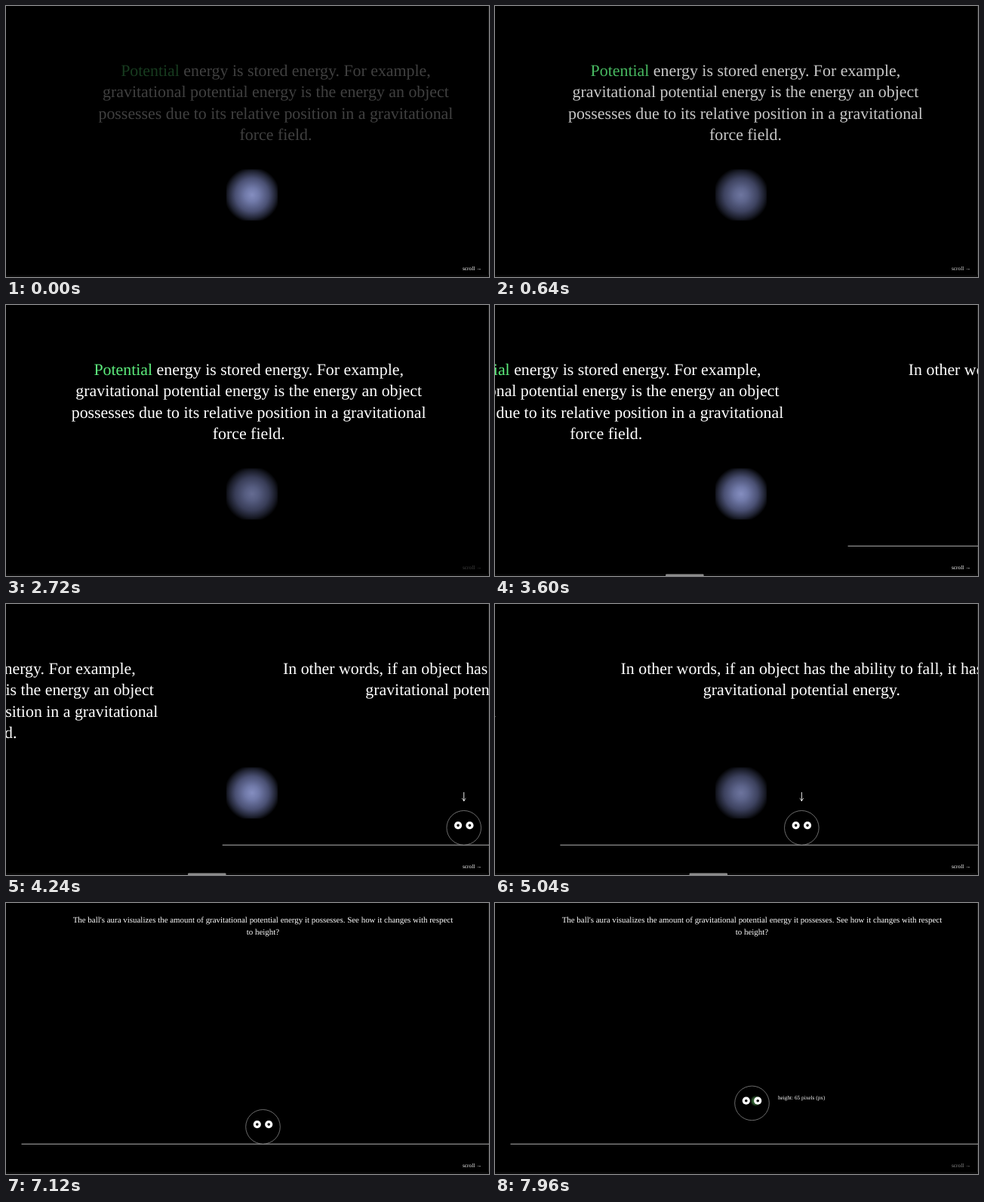
An HTML page for the animation above (8 s loop, 640 px wide and 360 px high).

```html
<!DOCTYPE html>
<html lang="en">
<head>
<meta charset="utf-8">
<title>Potential energy</title>
<style>
  html, body { margin: 0; width: 100%; height: 100%; overflow: hidden; background: #000; }
  svg { display: block; width: 640px; height: 360px; }
  text { font-family: "Liberation Serif", "Times New Roman", serif; fill: #fff; text-rendering: geometricPrecision; }
  .big { font-size: 21.87px; text-anchor: middle; }
  .mid { font-size: 10.94px; text-anchor: middle; }
  .small { font-size: 7.29px; }
  .key { fill: #5cec7c; }
</style>
</head>
<body>
<svg viewBox="0 0 640 360">
  <defs>
    <radialGradient id="blue" gradientUnits="userSpaceOnUse" cx="326" cy="251" r="37">
      <stop offset="0" stop-color="#858ec0"/>
      <stop offset=".25" stop-color="#717aa9"/>
      <stop offset=".6" stop-color="#4a5073"/>
      <stop offset=".85" stop-color="#1f2231"/>
      <stop offset="1" stop-color="#000"/>
    </radialGradient>
    <radialGradient id="green">
      <stop offset="0" stop-color="#3f7a3f"/>
      <stop offset=".6" stop-color="#2c552c"/>
      <stop offset="1" stop-color="#0a140a" stop-opacity="0"/>
    </radialGradient>
  </defs>
  <rect width="640" height="360"/>
  <rect x="639" width="1" height="357" fill="#1c1c1c"/>
  <rect y="357.5" width="640" height="2.5" fill="#0a0a0a"/>

  <rect id="glow" x="292" y="217" width="68" height="68" rx="8" fill="url(#blue)"/>

  <g id="intro" class="big">
    <text y="93"><tspan class="key">Potential</tspan> energy is stored energy. For example,</text>
    <text y="121.4">gravitational potential energy is the energy an object</text>
    <text y="149.9">possesses due to its relative position in a gravitational</text>
    <text y="178.3">force field.</text>
  </g>

  <g id="scene">
    <g id="words" class="big">
      <text y="93">In other words, if an object has the ability to fall, it has</text>
      <text y="121.4">gravitational potential energy.</text>
    </g>
    <path d="M-320 320.2H960" stroke="#b4b4b4"/>
    <path id="arrow" d="M0 250V261.8M-2.6 258.2Q-.8 259.4 0 261.8Q.8 259.4 2.6 258.2" fill="none" stroke="#fff" stroke-width=".9"/>
    <g id="ball">
      <circle r="22.8" stroke="#9a9a9a" stroke-width=".7"/>
      <circle id="aura" cx="5" cy="-3" r="8" fill="url(#green)"/>
      <g fill="#fff"><circle cx="-7.7" cy="-3.2" r="5.1"/><circle cx="7.7" cy="-3.2" r="5.1"/></g>
      <circle cx="-7.7" cy="-3.2" r="1.8"/>
      <circle cx="7.7" cy="-3.2" r="1.8"/>
      <text id="height" class="small" x="34.4" y="-4.6"></text>
    </g>
  </g>

  <g id="note" class="mid">
    <text x="340.4" y="26">The ball's aura visualizes the amount of gravitational potential energy it possesses. See how it changes with respect</text>
    <text x="340.4" y="42.4">to height?</text>
  </g>
  <text id="hint" class="small" x="605" y="351">scroll →</text>
  <rect id="thumb" y="357.6" width="50.5" height="3" rx="1.2" fill="#8c8c8c"/>
</svg>
<script>
const LOOP = 8000, CUT = 7120, LIFT = 7600;
const el = id => document.getElementById(id);
const clamp = v => Math.min(1, Math.max(0, v));
const set = (id, name, value) => el(id).setAttribute(name, value);
const fade = (id, v) => set(id, 'opacity', v.toFixed(3));
const move = (id, x, y = 0) => set(id, 'transform', `translate(${x.toFixed(2)} ${y.toFixed(2)})`);

// Smooth monotone curve through [time, value] points
function curve(...pts) {
  const slope = pts.slice(1).map((p, i) => (p[1] - pts[i][1]) / (p[0] - pts[i][0]));
  const tan = pts.map((_, i) => {
    const a = slope[i - 1], b = slope[i];
    if (a === undefined || b === undefined) return 0;
    return a * b > 0 ? 2 * a * b / (a + b) : 0;
  });
  return t => {
    if (t <= pts[0][0]) return pts[0][1];
    const i = pts.findIndex(p => p[0] > t) - 1;
    if (i < 0) return pts[pts.length - 1][1];
    const h = pts[i + 1][0] - pts[i][0], u = (t - pts[i][0]) / h, w = 1 - u;
    return pts[i][1] * (1 + 2 * u) * w * w + pts[i + 1][1] * (3 - 2 * u) * u * u
      + h * (tan[i] * u * w * w - tan[i + 1] * w * u * u);
  };
}

const remain = curve([2840, 621.5], [3000, 597], [4240, 266.5], [5040, 66], [5360, 33], [5840, 0.2], [6200, 0]);
const glow = curve([0, 1], [640, .83], [2000, .8], [2720, .76], [2880, .76], [3200, 1], [4240, 1],
  [5040, .82], [5400, .75], [5840, .36], [6520, 0]);
const hint = curve([0, 1], [640, .85], [1840, .5], [2720, .25], [2840, .25], [3200, 1], [7080, 1], [7200, .85], [7960, .55]);
const arrow = curve([5300, 1], [5840, .68], [6520, 0]);
const bar = curve([2840, 0], [2960, 1], [6240, 1], [6520, 0]);

function draw(t) {
  const p = clamp(.307 + t / 1690);
  const enter = (1 + Math.cos(Math.PI * p)) / 2;
  const left = remain(t);
  move('intro', 321.7 + 45.6 * enter - (621.5 - left));
  fade('intro', 1 - .96 * enter);

  const late = t >= CUT;
  move('scene', 340.5 + left);
  fade('words', late ? 0 : 1);
  fade('note', late ? 1 : 0);
  fade('arrow', arrow(t));

  const lift = Math.pow(clamp((t - LIFT) / 360), 1.3);
  move('ball', 0, 297.3 - 31.4 * lift);
  fade('aura', lift);
  fade('height', t > LIFT ? 1 : 0);
  el('height').textContent = `height: ${Math.round(65 * lift)} pixels (px)`;

  fade('glow', glow(t));
  fade('hint', hint(t));
  fade('thumb', bar(t));
  set('thumb', 'x', (263 - .0825 * left).toFixed(2));
}

const start = performance.now();
function tick() {
  draw((performance.now() - start) % LOOP);
  requestAnimationFrame(tick);
}
tick();
</script>
</body>
</html>
```
